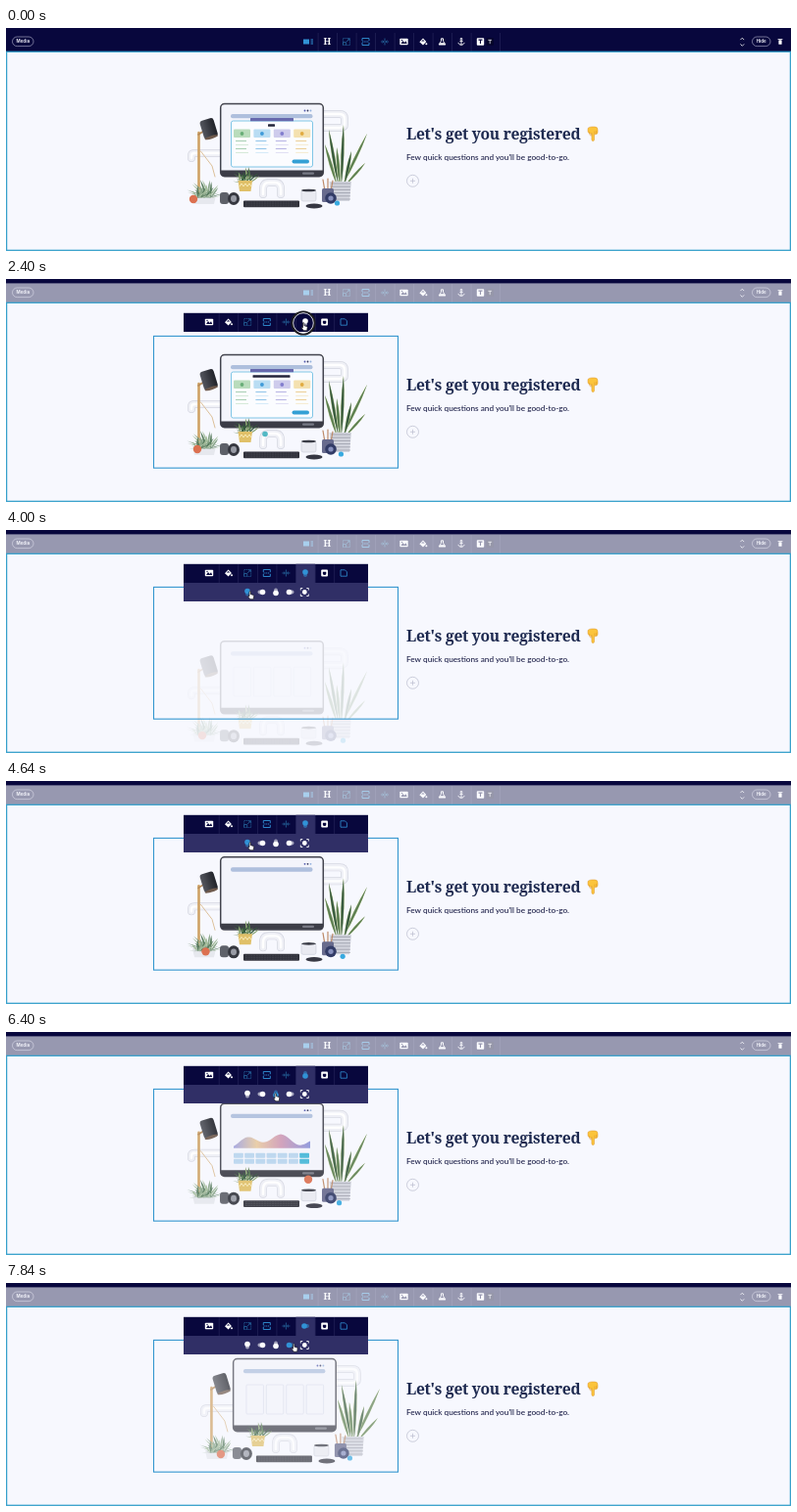
Write an HTML page that moves like this. It is 800 px wide and 228 px high and loops after 8000 ms.

```html
<!DOCTYPE html>
<html lang="en">
<head>
<meta charset="utf-8">
<title>Section editor</title>
<style>
  html, body { margin: 0; width: 100%; height: 100%; overflow: hidden; background: #f7f8fe; }
  svg { display: block; width: 100%; height: 100%; }
  .title { font: 700 15.6px "Noto Serif", serif; letter-spacing: -.28px; fill: #1e2a50; }
  .lead { font: 500 8.24px Lato, sans-serif; fill: #1c1f48; }
  .pill { font: 700 4.5px Inter, sans-serif; fill: #e6e6f0; text-anchor: middle; }
  .glyph { font: 900 9.5px "Noto Serif", serif; fill: currentColor; text-anchor: middle; }
  .white { color: #fff; }
  .blue { color: #3192d6; }
  .dim { color: #26689f; }
</style>
</head>
<body>
<svg viewBox="0 0 800 228" preserveAspectRatio="none">
  <defs>
    <linearGradient id="wave">
      <stop offset="0" stop-color="#8688d6"/><stop offset=".3" stop-color="#e5bd83"/>
      <stop offset=".62" stop-color="#c37d9f"/><stop offset="1" stop-color="#6874cf"/>
    </linearGradient>
    <linearGradient id="metal">
      <stop offset="0" stop-color="#55575f"/><stop offset="1" stop-color="#202229"/>
    </linearGradient>
    <g id="media"><path d="M-5-2.5h6v5h-6z" fill="currentColor"/><path d="M2.500-2H5M2.500 0H5M2.500 2H5" stroke="currentColor"/></g>
    <g id="heading"><text class="glyph" y="3.400">H</text></g>
    <g id="resize" fill="none" stroke="currentColor" stroke-width=".8"><path d="M-3.500-3.500h7v7h-7z" stroke-dasharray="1.200 .8"/><path d="M-3.500 3.500v-3h3v3M0 0l3-3M1-3h2v2"/></g>
    <g id="spacing" fill="none" stroke="currentColor" stroke-width=".9"><path d="M-3.500-1v-2.500h7V-1M-3.500 1v2.500h7V1"/><path d="M-3.500 0h7" stroke-dasharray="1.400 .8"/></g>
    <g id="align" fill="none" stroke="currentColor" stroke-width=".8"><path d="M0-3.500v7M-4 0h3M1 0h3M-2.500-1.300l1.500 1.300-1.500 1.300M2.500-1.300L1 0l1.500 1.300"/></g>
    <g id="image"><rect x="-4.200" y="-3.200" width="8.400" height="6.400" rx=".8" fill="currentColor"/><path d="M-3 2l2-3 1.500 2L2-.7 3.200 2z" fill="#08073d"/><circle cx="-2" cy="-1.600" r=".7" fill="#08073d"/></g>
    <g id="bucket"><path d="M-3.600.2L0-3.400l3.300 3.300L0 3.400z" fill="currentColor"/><path d="M-1.800-.4h3.300L0-2z" fill="#08073d"/><circle cx="3.400" cy="2.300" r="1" fill="currentColor"/></g>
    <g id="flask"><path d="M-1-3.200h2v2.500L3.400 3h-6.800L-1-.7z" fill="none" stroke="currentColor"/><path d="M-2 1.200h4L3 3h-6z" fill="currentColor"/></g>
    <g id="anchor" fill="none" stroke="currentColor" stroke-width=".9"><circle cy="-2.800" r=".9"/><path d="M0-1.900v5.400M-1.600-.6h3.200M-3 .9C-2.800 4 2.800 4 3 .9"/></g>
    <g id="type"><rect x="-3.700" y="-3.700" width="7.400" height="7.400" rx=".8" fill="currentColor"/><path d="M-2-1.900h4M0-1.900v4" stroke="#08073d" stroke-width="1.100"/></g>
    <g id="slide"><rect x="-1.900" y="-1" width="3.800" height="5" rx="1.800" fill="currentColor" opacity=".55"/><circle cy="-1" r="2.800" fill="currentColor"/></g>
    <g id="mask"><rect x="-3.400" y="-3.400" width="6.800" height="6.800" rx="1" fill="currentColor"/><path d="M-1.700-1.200h3.400v1.600a1.700 1.700 0 0 1-3.400 0z" fill="#08073d"/></g>
    <g id="corner"><path d="M-3.200-3.200h4.400l2 2v4.400h-6.400z" fill="none" stroke="currentColor" stroke-width=".8"/></g>
    <g id="zoom"><circle r="2.400" fill="currentColor"/><path d="M-4-2v-2h2M2-4h2v2M4 2v2H2M-2 4h-2V2" fill="none" stroke="currentColor" stroke-width=".9"/></g>
  </defs>

  <rect width="800" height="228" fill="#f7f8fe"/>
  <g id="art"></g>
  <text class="title" x="408" y="114">Let's get you registered</text>
  <g fill="#fbc43c" stroke="#dd972c" stroke-width=".5">
    <path d="M593 102.500q1.500-1.500 4-1.500h3q3 0 3 3v2.500q0 2.300-2.500 2.300h-1v5.200q0 1.600-1.300 1.600t-1.300-1.600v-5.200l-2.500-1q-1.400-.8-1.400-2.300z"/>
    <path d="M594.500 106q0 3 1 4 1.300.8 1.400-1v-2M599.800 105.500v3M601.600 105v3" fill="none"/>
  </g>
  <text class="lead" x="408" y="135.300">Few quick questions and you'll be good-to-go.</text>
  <g fill="none" stroke="#b9bccd" stroke-width=".7"><circle cx="414.500" cy="156.300" r="6"/><path d="M412 156.300h5M414.500 153.800v5"/></g>

  <rect width="800" height="24" fill="#08073d"/>
  <g id="mainBar"></g>
  <rect id="veil" y="4.400" width="800" height="19.600" fill="#f7f8fe"/>
  <rect x=".6" y="24.300" width="798.800" height="203" fill="none" stroke="#36a0cb" stroke-width="1.300"/>

  <g id="selection">
    <rect x="150.500" y="58.400" width="249" height="134.800" fill="none" stroke="#3496cf" stroke-width="1.100"/>
    <rect x="181" y="34.800" width="188" height="19.200" fill="#08073d"/>
    <g id="panel"><path d="M181 54h188v19H181zM295.500 34.800h19.500v19.200h-19.500z" fill="#302f66"/><g id="panelIcons"></g></g>
    <g id="imageBar"></g>
    <use id="effectIcon" href="#slide"/>
  </g>
  <g id="ring" fill="none"><circle cx="303" cy="45" r="11.500" stroke="#1c1c20" stroke-width="2.200"/><circle cx="303" cy="45" r="10.300" stroke="#e3e3e8" stroke-width=".9"/></g>
  <path id="cursor" d="M-1.500-4q.8-.9 1.400 0v2.700l2.600.7q.8.300.7 1.100l-.5 3.300h-3.400L-2.800 1q0-1 1.300-.3z" fill="#fff" stroke="#15151c" stroke-width=".7"/>
</svg>
<script>
const LOOP = 8000, STEP = 160, SLIDE_TIME = 900, SLIDE_WAY = 43;
const el = id => document.getElementById(id);
const show = (id, on) => el(id).setAttribute('visibility', on ? 'visible' : 'hidden');
const clamp = v => Math.max(0, Math.min(1, v));
const range = n => [...Array(n).keys()];

const rect = (x, y, w, h, fill, r = 0, extra = '') =>
  `<rect x="${x}" y="${y}" width="${w}" height="${h}" rx="${r}" fill="${fill}" ${extra}/>`;
const ellipse = (x, y, rx, ry, fill, extra = '') =>
  `<ellipse cx="${x}" cy="${y}" rx="${rx}" ry="${ry}" fill="${fill}" ${extra}/>`;
const line = (d, color, w = 1) =>
  `<path d="${d}" fill="none" stroke="${color}" stroke-width="${w}" stroke-linecap="round" stroke-linejoin="round"/>`;
const tube = d => line(d, '#d5d7e1', 8) + line(d, '#eff0f6', 6.6) + line(d, '#fff', 2.4);
const leaf = (x, y, tipX, tipY, w, fill) =>
  `<path d="M${x} ${y}Q${(x + tipX) / 2 - w} ${(y + tipY) / 2} ${tipX} ${tipY}Q${(x + tipX) / 2 + w} ${(y + tipY) / 2} ${x} ${y}" fill="${fill}"/>`;
const icon = (name, x, y, color = 'white', turn = 0) =>
  `<use href="#${name}" class="${color}" transform="translate(${x} ${y}) rotate(${turn})"/>`;

// Toolbars
const tones = { media: 'blue', resize: 'dim', spacing: 'blue', align: 'dim', corner: 'blue' };
const iconRow = (names, x0, y, pitch, top) => names.map((name, i) => {
  const x = x0 + pitch * i;
  return (name ? icon(name, x, y, tones[name]) : '') +
    (i < names.length - 1 ? rect(x + pitch / 2, top, .7, 19, '#25255a') : '');
}).join('');
const pill = (x, w, label) =>
  rect(x, 9, w, 9.6, 'none', 4.8, 'stroke="#b9b9d2" stroke-width=".6"') +
  `<text class="pill" x="${x + w / 2}" y="15.400">${label}</text>`;

el('mainBar').innerHTML =
  iconRow(['media', 'heading', 'resize', 'spacing', 'align', 'image', 'bucket', 'flask', 'anchor', 'type'], 308, 14, 19.5, 5) +
  rect(489.5, 10.3, 7.4, 7.4, '#04042a', .8) + line('M491.700 12.300h3M493.200 12.300v3.500', '#fff', .7) +
  rect(503, 5, .7, 19, '#25255a') + pill(6.5, 21.5, 'Media') + pill(760.5, 18.5, 'Hide') +
  line('M748.700 11.800l1.600-1.600 1.600 1.600M748.700 16.700l1.600 1.600 1.600-1.600', '#fff', .8) +
  rect(787.4, 12.2, 3.2, 4.6, '#fff', .6) + line('M787 11.500h4', '#fff', .8);
el('imageBar').innerHTML =
  iconRow(['image', 'bucket', 'resize', 'spacing', 'align', '', 'mask', 'corner'], 207, 44, 19.6, 35);

const effects = [
  { start: 3868, x: 246, turn: 0, dx: 0, dy: 1 },
  { start: 5034, x: 260.5, turn: 90, dx: -1, dy: 0 },
  { start: 5806, x: 275, turn: 180, dx: 0, dy: -1 },
  { start: 7410, x: 289.5, turn: 270, dx: 1, dy: 0 }
];
el('panelIcons').innerHTML =
  effects.map(e => icon('slide', e.x, 63.5, 'white', e.turn)).join('') + icon('zoom', 304.3, 63.5);

// Desk illustration
const lamp =
  line('M196.500 107V172', '#cfa264', 2.6) + line('M198.500 126L210 141 213 152', '#dcc09a', 1) +
  line('M196 109l9-6', '#b58a58', 1.6) + rect(192, 171, 10, 2, '#c79a64', 1) +
  `<g transform="rotate(-17 207 103)">${rect(199.5, 93, 14.5, 19.5, 'url(#metal)', 3)}${ellipse(206.7, 112, 7, 1.6, '#6f5a4d')}</g>`;
const bush = (x, y, r, count, colors) => range(count).map(i => {
  const a = Math.PI * (1 + (i + .5) / count), s = r * (.8 + .25 * Math.sin(i * 5));
  return leaf(x + (i % 5 - 2) * r / 6, y, x + Math.cos(a) * s, y + Math.sin(a) * s, 2, colors[i % 3]);
}).join('');
const snakePlant = [[325, 119], [329, 104], [337, 122], [344, 99], [368, 108], [352, 126], [366, 138]]
  .map(([x, y], i) => leaf(337 + i * 1.6, 160, x, y, 3.4, '#a8bb80') +
    leaf(337 + i * 1.6, 160, x, y, 2.5, i % 2 ? '#385a3f' : '#5c7f52')).join('');
const pots =
  snakePlant + `<path d="M329.500 157h22.500l-2 20h-18.500z" fill="#d3d5de"/>` +
  range(6).map(i => line(`M331.500 ${159 + i * 3.2}h19`, '#9a9ca9', .8)).join('') +
  `<path d="M190 171h24l-2 9h-20z" fill="#e6e8ee"/>` +
  bush(202, 174, 19, 31, ['#87a487', '#577b5d', '#a5bd9d']) +
  bush(244, 158, 16, 17, ['#54794d', '#355a3c', '#88a270']) +
  `<path d="M236.500 156h14.500l-1.500 11h-11.500z" fill="#e0c068"/>` +
  line('M238 162l2-3 2 3 2-3 2 3 2-3 2 3', '#f8eab7', 1);
const props =
  tube('M262 170v-5q0-7 6-7h6q6 0 6 7v5') +
  rect(218, 168, 9, 12, '#5d6068', 3) + ellipse(232, 174.5, 6, 6.5, '#35373f') + ellipse(232, 174.5, 3, 3.4, '#989ba5') +
  rect(301, 166, 15, 11, '#e9eaf1', 2, 'stroke="#c6c9d5" stroke-width=".6"') + ellipse(308.5, 166, 7.5, 1.3, '#3b3d47') +
  line('M325 167l-2-12M328 167v-13M331 167l2-11', '#bd8a68', 1.2) + rect(322, 164, 12, 14, '#676a8d', 1.5) +
  ellipse(331, 174, 5.8, 5.8, '#323b66') + ellipse(331, 174, 2.6, 2.6, '#8790bd') +
  rect(242, 176.5, 57, 6.8, '#30313a', 1) +
  range(3).map(i => `<path d="M244 ${178 + i * 1.9}h53" stroke="#484a54" stroke-width=".7" stroke-dasharray="2 .7"/>`).join('') +
  ellipse(314, 182, 8.5, 2.4, '#363742');
const monitor =
  rect(218.7, 77.5, 104.6, 74.2, '#f3f4fb', 4, 'stroke="#42434d" stroke-width="1.500"') +
  `<path d="M219 145.500h104v3q0 3-3 3h-98q-3 0-3-3z" fill="#3b3c46"/>` +
  rect(302, 147.5, 12, 2.2, '#777984', 1) + rect(229, 88, 83.5, 4.3, '#aebfdd', 2) +
  ellipse(304.5, 84.5, .9, .9, '#4d56aa') + ellipse(307.5, 84.5, .9, .9, '#30345d') + ellipse(310.5, 84.5, .9, .9, '#8caddb');

// Screen contents
const hues = [['#b9dcbc', '#69ae78'], ['#b9ddf3', '#3f9bd9'], ['#cecbec', '#827dce'], ['#f4e1b0', '#e1ab41']];
const cards =
  rect(229.5, 95, 83, 47, '#fbfcff', 2, 'stroke="#72c0e4" stroke-width=".9"') + rect(249, 92, 44, 3.3, '#6769ad', .5) +
  hues.map(([soft, strong], i) => {
    const x = 232 + i * 20.4;
    return rect(x, 103.5, 17, 8.5, soft, 1) + ellipse(x + 8.5, 108, 1.9, 1.9, strong) +
      range(4).map(row => rect(x + 2, 115 + row * 4, row % 2 ? 13 : 11, .8, row % 2 ? soft : strong, 0, 'opacity=".7"')).join('');
  }).join('') + rect(291.5, 134.5, 17.5, 4, '#34a0d5', 2);
const columns = range(4).map(i =>
  rect(232 + i * 20.4, 104, 17.5, 30, 'none', 1, 'stroke="#d5d9e7" stroke-width=".7"')).join('');
const waveTop = range(40).map(i => {
  const u = i / 39;
  return `L${232 + 78 * u} ${115.5 - 4 * Math.sin(u * 14 - .9) - 3 * Math.sin(u * 5 - 1)}`;
}).join('');
const chart = `<path id="waveShape" d="M232 123${waveTop}L310 123z" fill="url(#wave)" fill-opacity=".75"/>`;
const tiles = range(14).map(i => {
  const col = i >> 1, row = i % 2;
  return `<g class="tile">${rect(232 + col * 11.2, 128 + row * 6, 9.8, 5, col === 6 ? '#43b6d7' : '#b8d5ee', .8)}</g>`;
}).join('');

el('art').innerHTML =
  tube('M189 133v-2q0-3 3-3h30') + tube('M322 88h18q5 0 5 5v5q0 4-5 4h-18') + monitor +
  `<g id="cards">${cards}<rect id="banner" y="98.300" height="2.500" rx=".5" fill="#23243a"/></g>` +
  `<g id="columns">${columns}</g><g id="chart">${chart}${tiles}</g>` +
  lamp + pots + props +
  ellipse(0, 0, 4.2, 4.2, '#dc7050', 'id="redBall"') + ellipse(0, 0, 2.6, 2.6, '#37a9df', 'id="blueBall"') +
  ellipse(264, 158.5, 2.8, 2.8, '#52b8c4', 'id="tealBall"');

// Keys are [time, x, y]
function track(keys, t) {
  const i = keys.findIndex(k => k[0] > t);
  if (i <= 0) return keys.at(i).slice(1);
  const [a, b] = [keys[i - 1], keys[i]];
  const u = (t - a[0]) / (b[0] - a[0]), s = u * u * (3 - 2 * u);
  return [a[1] + (b[1] - a[1]) * s, a[2] + (b[2] - a[2]) * s];
}
const cursorPath = [
  [160, 332, 218], [1120, 283, 121], [1440, 283, 121], [2240, 304, 49], [2720, 304, 49],
  [3800, 249.5, 67], [4640, 249.5, 67], [5034, 260, 67], [5500, 260, 67], [5806, 275.5, 67],
  [6880, 275.5, 67], [7410, 294, 66.5], [8000, 294, 66.5]
];
const redPath = [
  [0, 191, 175], [1280, 190, 174], [2400, 195, 174], [4000, 200, 174], [5280, 207, 174],
  [5900, 268, 164], [6400, 308, 155], [6900, 308, 155], [7840, 206, 175], [8000, 204, 175]
];
const place = (id, [x, y]) => el(id).setAttribute('transform', `translate(${x} ${y})`);

function render(t) {
  el('veil').setAttribute('opacity', .6 * clamp((t - 320) / 320));
  show('selection', t >= 480);
  show('panel', t >= 2560);
  show('ring', t >= 2240 && t < 2560);
  show('cursor', t >= 320);
  place('cursor', track(cursorPath, t));

  const current = effects.findLast(e => t >= e.start);
  const progress = current ? 1 - (1 - clamp((t - current.start) / SLIDE_TIME) ** 1.5) ** 3 : 1;
  const shift = (1 - progress) * SLIDE_WAY;
  place('art', current ? [current.dx * shift, current.dy * shift] : [0, 0]);
  el('art').setAttribute('opacity', progress);
  el('effectIcon').setAttribute('class', current ? 'blue' : 'white');
  el('effectIcon').setAttribute('transform', `translate(305 44) rotate(${current ? current.turn : 0})`);
  effects.forEach((e, i) => el('panelIcons').children[i].setAttribute('class', e === current ? 'blue' : 'white'));

  const charting = t >= 4640 && t < 7200;
  show('cards', t < 3520);
  show('columns', t >= 3520 && !charting);
  show('chart', charting);
  const bannerWidth = 7 + 31 * clamp(t / 800);
  el('banner').setAttribute('x', 270.5 - bannerWidth / 2);
  el('banner').setAttribute('width', bannerWidth);
  const grow = clamp((t - 4640) / 480);
  el('waveShape').setAttribute('transform', `translate(0 ${123 * (1 - grow)}) scale(1 ${grow})`);
  document.querySelectorAll('.tile').forEach((tile, i) =>
    tile.setAttribute('opacity', clamp((t - 5000 - i * 75) / 160)));

  place('redBall', track(redPath, t));
  place('blueBall', [340.5 - 3 * Math.cos(t / LOOP * 2 * Math.PI), 179]);
  el('tealBall').setAttribute('opacity', t >= 2000 && t < 2880 ? 1 : 0);
}

function frame() {
  render(Math.floor(performance.now() % LOOP / STEP) * STEP);
  requestAnimationFrame(frame);
}
frame();
</script>
</body>
</html>
```
